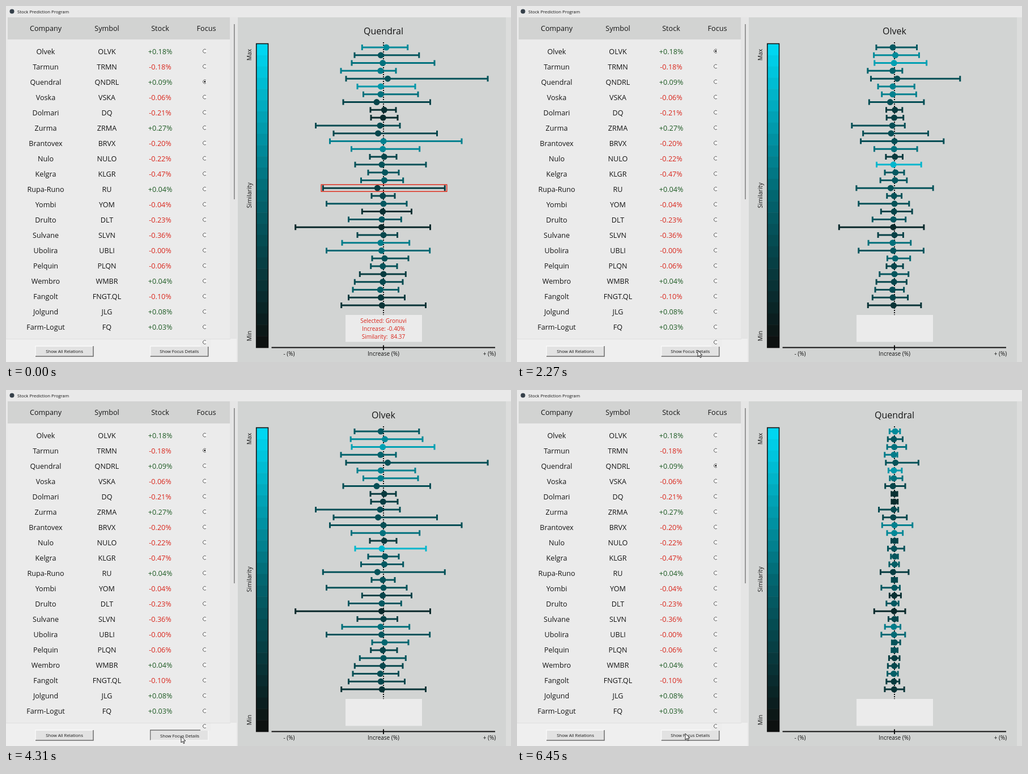
An HTML page that plays this animation: 891x628 px, repeating every 6480 ms.

```html
<!DOCTYPE html>
<html lang="en">
<head>
<title>Stock Prediction Program</title>
<style>
  html, body { margin: 0; width: 100%; height: 100%; overflow: hidden; background: #e9e9e9; }
  svg { display: block; width: 891px; height: 628px; font-family: "Open Sans", "Noto Sans", sans-serif; fill: #141414; }
  .cell { font-size: 12.6px; text-anchor: middle; }
  .up { fill: #1d5a23; }
  .down { fill: #d9261c; }
  .small { font-size: 7.75px; }
  .axis { font-size: 10px; text-anchor: middle; }
  .side { font-size: 10.4px; text-anchor: middle; }
  .title { font-size: 16px; text-anchor: middle; }
  .whisker { fill: none; stroke-width: 3; }
</style>
</head>
<body>
<svg id="stage" viewBox="0 0 891 628">
  <rect width="891" height="628" fill="#e9e9e9"/>
  <circle cx="10.5" cy="9.5" r="4" fill="#36404a"/>
  <text class="small" x="20" y="12.6">Stock Prediction Program</text>
  <rect x="3" y="20" width="392" height="39" fill="#d2d3d2"/>
  <rect x="3" y="59" width="392" height="528" fill="#ebebeb"/>
  <rect x="395" y="20" width="14" height="608" fill="#e5e5e5"/>
  <rect x="402" y="32" width="1.6" height="309" fill="#858585"/>
  <rect y="587" width="407" height="41" fill="#efefef"/>
  <rect y="587" width="396" height="1" fill="#dedede"/>
  <rect x="409" y="20" width="473" height="608" fill="#d2d4d3"/>
  <rect x="882" y="20" width="9" height="608" fill="#dcdddc"/>
  <g id="buttons"></g>
  <rect x="343" y="588" width="19" height="13" fill="#ededed"/>
  <g id="table"></g>
  <g id="scale"></g>
  <path d="M666 64V545" stroke="#111" stroke-width="2" stroke-dasharray="2 2"/>
  <path d="M468.5 602.5H863M666 598.5V607" stroke="#111" stroke-width="2" fill="none"/>
  <text class="side" transform="translate(433 86) rotate(-90)">Max</text>
  <text class="side" transform="translate(433 334) rotate(-90)">Similarity</text>
  <text class="side" transform="translate(433 582) rotate(-90)">Min</text>
  <text class="axis" x="499.5" y="616.8">- (%)</text>
  <text class="axis" x="666" y="616.8">Increase (%)</text>
  <text class="axis" x="853" y="616.8">+ (%)</text>
  <rect x="599" y="545" width="135" height="47.5" fill="#ebebeb"/>
  <text id="title" class="title" x="666" y="49.6"></text>
  <g id="chart"></g>
  <g id="info" class="axis down">
    <rect x="556.2" y="315.2" width="221.6" height="12" fill="none" stroke="#e0301f" stroke-width="1.5"/>
    <text x="666" y="558.6">Selected: Gronuvi</text>
    <text x="666" y="572.8">Increase: -0.40%</text>
    <text x="666" y="587" xml:space="preserve">Similarity:  84.37</text>
  </g>
  <path id="cursor" d="M0 0V11L2.6 8.7 4.4 12.7 6.1 11.9 4.3 8H7.8Z" fill="#fff" stroke="#111" stroke-width=".9"/>
</svg>
<script>
const LOOP = 6480, MID = 666;
const $ = id => document.getElementById(id);

function add(parent, tag, attrs, text) {
  const el = document.createElementNS("http://www.w3.org/2000/svg", tag);
  for (const key in attrs) el.setAttribute(key, attrs[key]);
  if (text) el.textContent = text;
  parent.appendChild(el);
  return el;
}

// Table
const companies = [
  ["Olvek", "OLVK", "+0.18%"], ["Tarmun", "TRMN", "-0.18%"], ["Quendral", "QNDRL", "+0.09%"],
  ["Voska", "VSKA", "-0.06%"], ["Dolmari", "DQ", "-0.21%"], ["Zurma", "ZRMA", "+0.27%"],
  ["Brantovex", "BRVX", "-0.20%"], ["Nulo", "NULO", "-0.22%"], ["Kelgra", "KLGR", "-0.47%"],
  ["Rupa-Runo", "RU", "+0.04%"], ["Yombi", "YOM", "-0.04%"], ["Drulto", "DLT", "-0.23%"],
  ["Sulvane", "SLVN", "-0.36%"], ["Ubolira", "UBLI", "-0.00%"], ["Pelquin", "PLQN", "-0.06%"],
  ["Wembro", "WMBR", "+0.04%"], ["Fangolt", "FNGT.QL", "-0.10%"], ["Jolgund", "JLG", "+0.08%"],
  ["Farm-Logut", "FQ", "+0.03%"]
];
const columns = [70, 178, 272, 353.5];
const table = $("table");
const cell = (col, y, text, tone = "") =>
  add(table, "text", { class: "cell " + tone, x: columns[col], y: y + 4.5 }, text);

["Company", "Symbol", "Stock", "Focus"].forEach((name, i) => cell(i, 39.5, name));
companies.forEach((row, i) => row.forEach((text, col) =>
  cell(col, 80 + 27 * i, text, col < 2 ? "" : text[0] === "+" ? "up" : "down")));

const radioY = i => 79.5 + 27.03 * i;
for (let i = 0; i < 20; i++) {
  add(table, "circle", { cx: 350.8, cy: radioY(i), r: 3.2, fill: "#fafafa" });
  add(table, "path", {
    d: `M352.8 ${radioY(i) - 2.6}A3.3 3.3 0 1 0 352.8 ${radioY(i) + 2.6}`,
    fill: "none", stroke: "#555", "stroke-width": 1
  });
}
const radioDot = add(table, "circle", { cx: 350.8, r: 1.5, fill: "#111" });

// Buttons
function addButton(x, width, label) {
  const group = add($("buttons"), "g", {});
  add(group, "rect", { x, y: 600, width, height: 18.5, fill: "#e2e2e2" });
  const light = add(group, "path", { d: `M${x} 618V600H${x + width}`, fill: "none", "stroke-width": 1.3 });
  const dark = add(group, "path", { d: `M${x} 618H${x + width}V600`, fill: "none", "stroke-width": 1.5 });
  const text = add(group, "text", { class: "small", x: x + width / 2, y: 611.8, "text-anchor": "middle" }, label);
  return pressed => {
    light.setAttribute("stroke", pressed ? "#707070" : "#fafafa");
    dark.setAttribute("stroke", pressed ? "#f6f6f6" : "#6c6c6c");
    text.setAttribute("transform", pressed ? "translate(.8 .8)" : "");
  };
}
addButton(52, 102, "Show All Relations")(false);
const setPressed = addButton(254.7, 102, "Show Focus Details");

// Similarity colours, 0 to 100
function shade(value) {
  const low = [13, 17, 16], middle = [2, 102, 112], high = [0, 214, 241];
  const [a, b] = value < 50 ? [low, middle] : [middle, high];
  const u = (value < 50 ? value : value - 50) / 50;
  return `rgb(${a.map((c, i) => Math.round(c + (b[i] - c) * u))})`;
}
const STEPS = 27, stepHeight = 535 / STEPS;
for (let i = 0; i < STEPS; i++)
  add($("scale"), "rect", {
    x: 442, y: 67 + i * stepHeight, width: 20, height: stepHeight + 0.5,
    fill: shade(100 - i * 100 / (STEPS - 1))
  });
add($("scale"), "rect", { x: 441.7, y: 66.5, width: 20.8, height: 536, fill: "none", stroke: "#111", "stroke-width": 1.6 });

// Chart: low, mean and high position of each whisker
const lead = [[628.3, 671, 708.7], [615, 661.3, 728.8], [608.2, 668.5, 735]];
const shared = [
  [610, 664.7, 756], [591, 660.8, 688], [600, 673.5, 850], [620, 661.3, 722], [630.5, 661, 727],
  [595, 654, 748.5], [643, 667.3, 688], [644, 665.3, 691], [546.5, 660, 695], [578, 656.5, 760.5],
  [571.5, 666, 804], [609.5, 664.8, 729.7], [642, 667.3, 689], [616, 663, 741], [639, 668.7, 693],
  [626.5, 667.5, 700.7], [559.3, 655.3, 774.3], [645, 664.8, 686], [565.5, 666, 707], [628.3, 664.7, 715.5],
  [604.5, 663, 697.3], [510.7, 662.5, 748.5], [620, 666, 690.5], [593, 661, 711.7], [565.5, 662.5, 747.7],
  [646, 668, 710], [643.7, 664.8, 690], [624.3, 666, 705.3], [615.3, 664.7, 700], [612, 660.3, 692.5],
  [604.5, 661.3, 703.5], [591.7, 663.3, 740.5]
];
const similarity = [
  [42, 66, 76, 48, 36, 62, 62, 36, 24, 26, 36, 36, 36, 55, 24, 86, 42, 42, 38, 38, 38, 30, 42, 14, 28, 54, 40, 50, 30, 40, 32, 36, 32, 20],
  [46, 42, 33, 40, 8, 48, 50, 14, 26, 34, 36, 40, 42, 36, 38, 14, 50, 26, 24, 64, 42, 36, 44, 32, 46, 46, 38, 70, 26, 42, 34, 42, 16, 34],
  [66, 40, 55, 60, 38, 72, 55, 30, 18, 15, 34, 32, 62, 65, 30, 38, 40, 45, 26, 32, 42, 18, 42, 14, 32, 60, 52, 38, 38, 25, 33, 45, 24, 20]
];
const bars = similarity[0].map(() => ({
  line: add($("chart"), "path", { class: "whisker" }),
  dot: add($("chart"), "circle", { r: 5.5 })
}));

function drawChart(focus, grown) {
  const rows = [...lead.filter((_, i) => i !== focus), ...shared];
  $("title").textContent = companies[focus][0];
  bars.forEach(({ line, dot }, i) => {
    const y = 73 + 13.79 * i, color = shade(similarity[focus][i]);
    const [low, mean, high] = rows[i].map(x => MID + (x - MID) * grown);
    line.setAttribute("d", `M${low} ${y - 5}v10m0-5H${high}m0-5v10`);
    line.setAttribute("stroke", color);
    dot.setAttribute("cx", mean);
    dot.setAttribute("cy", y);
    dot.setAttribute("fill", color);
  });
}

// Timeline
const presses = [1940, 4160, 6187], HOLD = 190, DELAY = 240, GROWTH = 0.0109;
const focusChanges = [[0, 2], [750, 0], [3150, 1], [5640, 2]];
const cursorPath = [
  [270, 384, -10], [400, 368, 40], [550, 349, 82], [750, 349, 82], [880, 349, 150], [1080, 345, 300],
  [1370, 331, 517], [1560, 323, 583], [1760, 319, 609], [2540, 319, 607], [2570, 320, 600], [2800, 335, 380],
  [3050, 349, 108], [3230, 349, 108], [3330, 351, 165], [3560, 350.5, 370], [3760, 322, 560], [3890, 309, 611],
  [4820, 309, 611], [4950, 316, 550], [5250, 336, 310], [5540, 345, 139], [5600, 349, 134], [5720, 349, 134],
  [5900, 332, 350], [6050, 304, 552], [6140, 297, 606], [LOOP, 297, 606]
];

function cursorAt(t) {
  const next = cursorPath.findIndex(key => key[0] > t);
  const [t0, x0, y0] = cursorPath[next - 1], [t1, x1, y1] = cursorPath[next];
  const u = (t - t0) / (t1 - t0);
  return [x0 + (x1 - x0) * u, y0 + (y1 - y0) * u];
}

function draw(t) {
  const selected = focusChanges.filter(([at]) => at <= t).pop()[1];
  radioDot.setAttribute("cy", radioY(selected));
  setPressed(presses.some(at => t >= at && t < at + HOLD));

  const shown = presses.filter(at => at + DELAY <= t).length;
  const grown = shown ? 1 - Math.exp(-GROWTH * (t - presses[shown - 1] - DELAY)) : 1;
  drawChart([2, 0, 1, 2][shown], grown > 0.998 ? 1 : grown);
  $("info").style.display = shown ? "none" : "";

  const visible = t >= cursorPath[0][0];
  $("cursor").style.display = visible ? "" : "none";
  if (visible) $("cursor").setAttribute("transform", `translate(${cursorAt(t)})`);
}

const start = performance.now();
function tick() {
  draw((performance.now() - start) % LOOP);
  requestAnimationFrame(tick);
}
tick();
</script>
</body>
</html>
```
